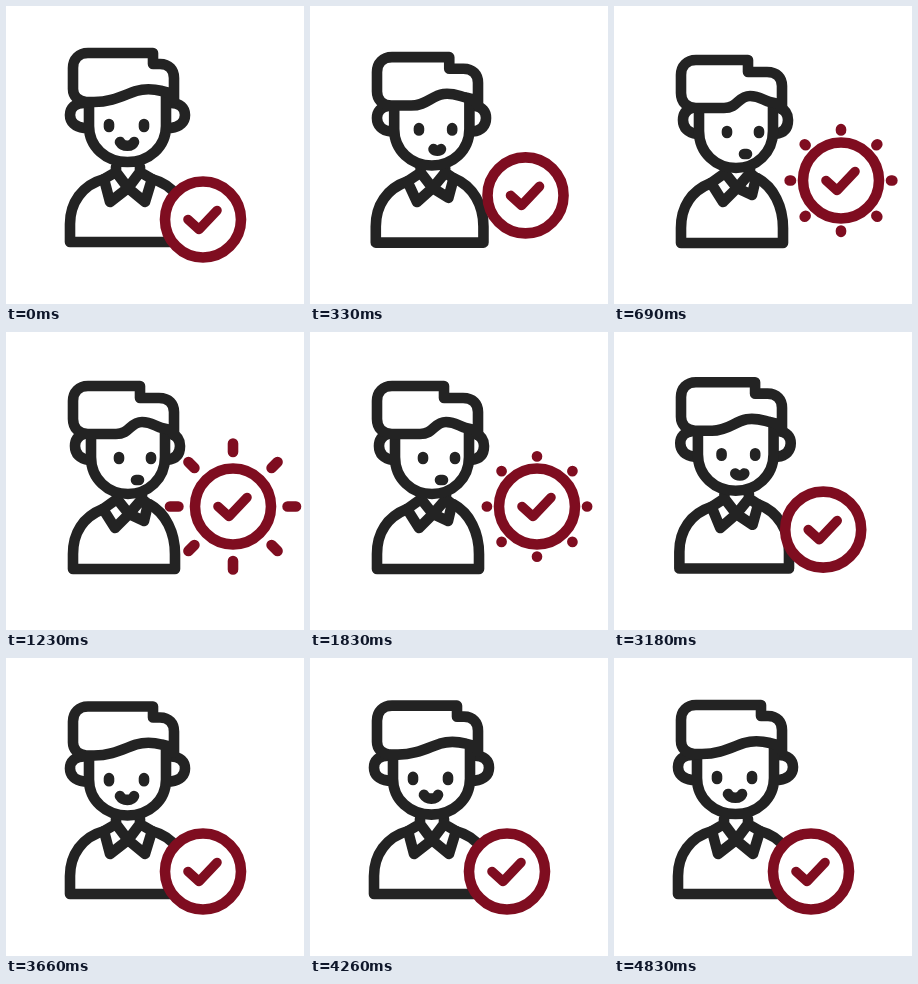
Write an HTML page that moves like this. It is 298x298 px and loops after 5.1 s.

```html
<!DOCTYPE html>
<html lang="en">
<head>
<meta charset="utf-8">
<style>
  html, body { margin: 0; width: 100%; height: 100%; overflow: hidden; background: #fff; }
  svg { display: block; width: 100%; height: 100%; }
  path, circle { stroke-linecap: round; stroke-linejoin: round; }
</style>
</head>
<body>
<svg viewBox="0 0 298 298" fill="none" stroke="#232323" stroke-width="10.6">
  <g id="body"></g>
  <g id="head"></g>
  <g id="face"></g>
  <g id="badge" stroke="#7f0d20">
    <circle r="38" fill="#fff"/>
    <path d="M-15 0L-4 10L14 -9" stroke-width="9.6"/>
    <path id="rays"/>
  </g>
</svg>
<script>
const LOOP = 5100, STEP = 30;
const $ = id => document.getElementById(id);

// Each part: group, fill, path facing front, path turned aside.
// Both paths of a part share the same commands so they can be blended.
const parts = [
  ['body', 'none',
    'M98 173C76 179 64 197 64 218V236H180V218C180 197 168 179 146 173',
    'M97 177C77 185 67 201 67 222V237H169V222C169 201 160 181 143 172'],
  ['body', 'none',
    'M110 161V166L98 173L104 196L122 182L139 196L146 173L134 166V161M110 166L122 182L134 166',
    'M111 163V167L97 177L109 196L123 182L138 189L142 172L136 167V163M111 167L123 182L136 167'],
  ['head', 'none',
    'M78 97C69 97 64 102 64 109C64 116 69 121 78 122M165 97C174 97 179 102 179 109C179 116 174 121 165 122',
    'M78 102C72 104 69 108 69 114C69 122 74 127 83 128M166 102C171 104 174 108 174 114C174 122 170 127 161 128'],
  ['head', '#fff',
    'M83 97V120C83 141 100 156 121.5 156C143 156 160 141 160 120V90',
    'M85 103V125C85 147 102 162 122 162C142 162 159 147 159 125V99'],
  ['head', '#fff',
    'M82 47H147V58H154C163 58 168 64 168 72V93C166 88 162 86 156 85C148 83 140 82 130 85C116 90 105 96 88 96H80C72 95 67 90 67 83V62C67 53 73 47 82 47Z',
    'M82 54H134V66H153C163 66 168 72 168 80V103C166 98 162 97 156 96C150 95 146 90 136 90C124 90 124 102 110 102H82C73 102 67 96 67 87V69C67 60 73 54 82 54Z'],
  ['face', 'none',
    'M103 118V121M138 118V121M114 136C117 141 126 141 128 136',
    'M113 125V127M145 125V127M130 148C131 148 132 148 133 148']
].map(([group, fill, front, side]) => {
  const el = document.createElementNS('http://www.w3.org/2000/svg', 'path');
  el.setAttribute('fill', fill);
  $(group).append(el);
  return { el, front, side: side.match(/[\d.]+/g) };
});

const mix = (a, b, k) => a + (b - a) * k;
const ease = (t, from, to) => {
  const x = Math.min(1, Math.max(0, (t - from) / (to - from)));
  return x * x * (3 - 2 * x);
};
const turn = (t, outEnd, backEnd) => ease(t, 0, outEnd) - ease(t, 2910, backEnd);

// Rays grow outwards, then their inner ends catch up.
function rays(t) {
  const start = [600, 1800].find(s => t > s && t < s + 900);
  if (start === undefined) return '';
  const inner = mix(50, 63, ease(t, start + 450, start + 900));
  const outer = mix(50, 63, ease(t, start, start + 450));
  let d = '';
  for (let i = 0; i < 8; i++) {
    const x = Math.cos(i * Math.PI / 4), y = Math.sin(i * Math.PI / 4);
    d += `M${x * inner} ${y * inner}L${x * outer} ${y * outer}`;
  }
  return d;
}

function draw(t) {
  const pose = turn(t, 585, 3420);
  for (const { el, front, side } of parts) {
    let i = 0;
    el.setAttribute('d', front.replace(/[\d.]+/g, n => mix(+n, +side[i++], pose)));
  }

  const nod = t > 3540 && t < 4830 ? (1 - Math.cos((t - 3540) / 645 * 2 * Math.PI)) / 2 : 0;
  $('head').setAttribute('transform', `translate(0 ${5 * nod})`);
  $('face').setAttribute('transform', `translate(0 ${7 * nod})`);

  const shift = turn(t, 570, 3390);
  $('badge').setAttribute('transform', `translate(${mix(197, 227, shift)} ${mix(213.5, 174.5, shift)})`);
  $('rays').setAttribute('d', rays(t));
}

const begin = performance.now();
function tick() {
  const t = (performance.now() - begin) % LOOP;
  draw(Math.floor(t / STEP) * STEP);
  requestAnimationFrame(tick);
}
tick();
</script>
</body>
</html>
```
